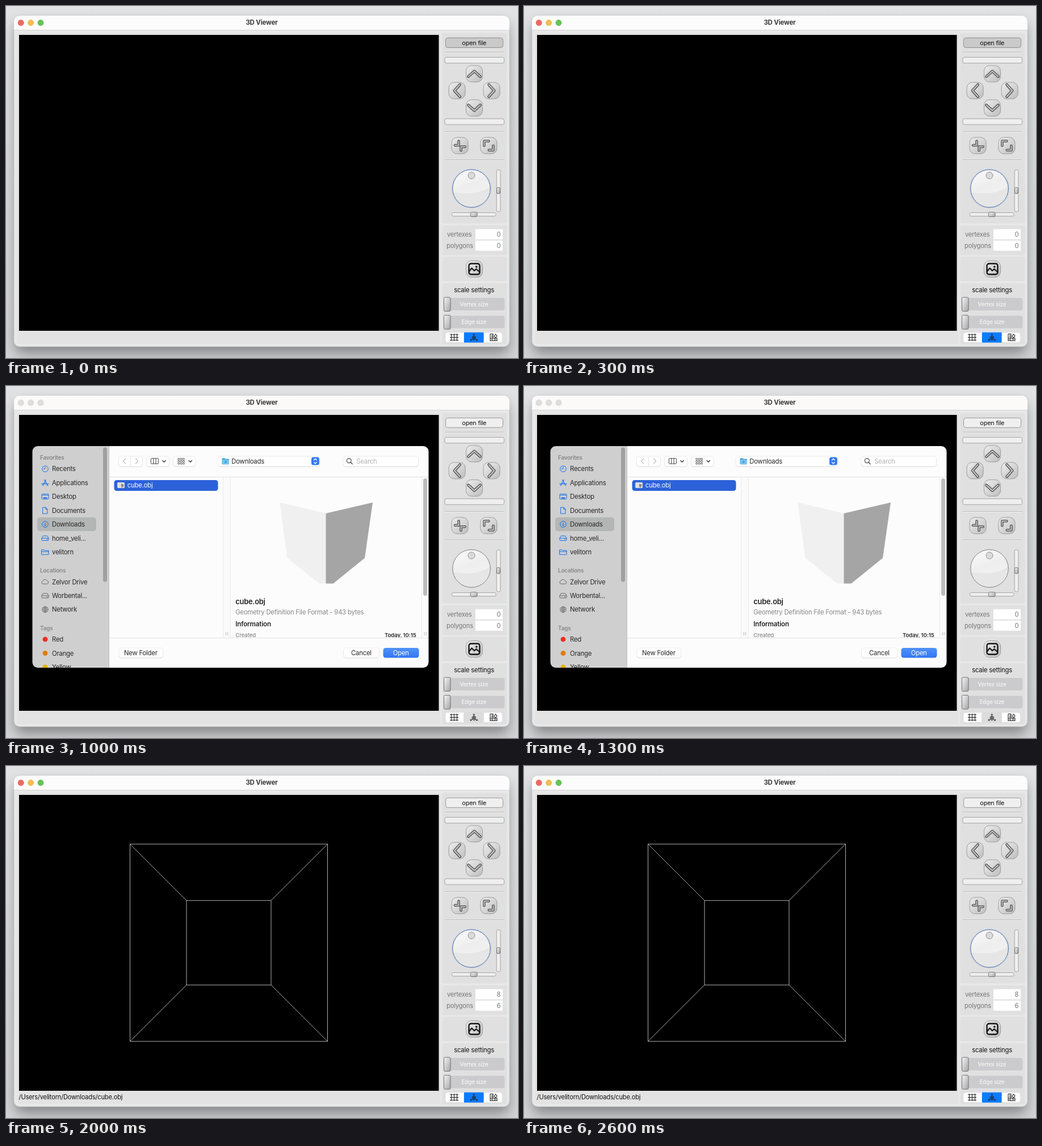
Recreate the animation shown at these times as an HTML page. Size 902 by 621 pixels, loop 3000 ms.

```html
<!DOCTYPE html>
<html lang="en">
<head>
<meta charset="utf-8">
<title>3D Viewer</title>
<style>
html, body { margin: 0; width: 100%; height: 100%; overflow: hidden; background: #dfe0e2; }
svg { display: block; width: 902px; height: 621px; font-family: Inter, "Open Sans", sans-serif; }
</style>
</head>
<body>
<svg id="stage" viewBox="0 0 902 621" xmlns="http://www.w3.org/2000/svg"></svg>
<script>
const LOOP = 3000;
const MARKS = [0, 500, 1000, 1500, 2000];

// --- drawing helpers -------------------------------------------------
const rect = (x, y, w, h, fill, r = 0, more = '') =>
  `<rect x="${x}" y="${y}" width="${w}" height="${h}" rx="${r}" fill="${fill}" ${more}/>`;
const dot = (x, y, r, fill, more = '') =>
  `<circle cx="${x}" cy="${y}" r="${r}" fill="${fill}" ${more}/>`;
const line = (d, color, w = 1, more = '') =>
  `<path d="${d}" fill="none" stroke="${color}" stroke-width="${w}" ${more}/>`;
const shape = (d, fill) => `<path d="${d}" fill="${fill}"/>`;
const text = (x, y, s, { size = 11.3, fill = '#262626', weight = 400, at = 'start', gap = -.2 } = {}) =>
  `<text x="${x}" y="${y}" font-size="${size}" fill="${fill}" font-weight="${weight}" text-anchor="${at}" letter-spacing="${gap}">${s}</text>`;
const when = (on, body) => `<g data-on="${on}">${body}</g>`;
const at = (x, y, body) => `<g transform="translate(${x} ${y})">${body}</g>`;
const edge = (color, w = 1) => `stroke="${color}" stroke-width="${w}"`;
const ROUND = 'stroke-linecap="round" stroke-linejoin="round"';

const fade = (id, stops, dir = 'x2="0" y2="1"') =>
  `<linearGradient id="${id}" ${dir}>${stops.map((c, i) =>
    `<stop offset="${i / (stops.length - 1)}" stop-color="${c}"/>`).join('')}</linearGradient>`;

const defs = `<defs>
  ${fade('back', ['#e1e2e4', '#d9dadc', '#d2d3d5'])}
  ${fade('metal', ['#ededed', '#d6d6d6', '#bdbdbd'], 'x2="1" y2="1"')}
  ${fade('knob', ['#f4f4f4', '#a6a6a6'], 'x2="1" y2="1"')}
  ${fade('dial', ['#fbfbfb', '#eeeeee', '#f3f3f3'], 'x2=".4" y2="1"')}
  ${fade('blue', ['#4f93f8', '#3276f4'])}
  ${fade('deep', ['#3c79ec', '#2a62db'])}
  <filter id="soft" x="-10%" y="-10%" width="120%" height="125%"><feGaussianBlur stdDeviation="11"/></filter>
  <clipPath id="sheet"><rect x="46.5" y="106" width="698" height="391" rx="9.5"/></clipPath>
  <clipPath id="pane"><rect x="396" y="161" width="336" height="282.5"/></clipPath>
</defs>`;

// --- main window -----------------------------------------------------
const lights = colors => colors.map(([c, b], i) =>
  dot(26.2 + i * 17.4, 29.6, 5.1, c, edge(b, .6))).join('');

function frame() {
  return rect(0, 0, 902, 621, 'url(#back)')
    + rect(16, 30, 869, 583, '#000', 12, 'opacity=".36" filter="url(#soft)"')
    + rect(14, 17, 873, 584, '#e8e8e8', 10, edge('#bfc0c1', .8))
    + `<path d="M14 42.5V27a10 10 0 0 1 10-10H877a10 10 0 0 1 10 10V42.5z" fill="#fcfcfc"/>`
    + when('01110', `<path d="M14 42.5V27a10 10 0 0 1 10-10H877a10 10 0 0 1 10 10V42.5z" fill="#fbfaf9"/>`)
    + line('M14 42.5H887', '#d5d5d5')
    + when('10001', lights([['#ed6a5f', '#d95448'], ['#f4be50', '#dca53a'], ['#62c555', '#4dad41']]))
    + when('01110', lights(Array(3).fill(['#dfdedd', '#c9c8c7'])))
    + text(450.5, 33.4, '3D Viewer', { size: 11.5, weight: 700, fill: '#3b3b3b', at: 'middle' })
    + rect(19.5, 47.5, 746, 549, '#e3e3e3', 3)
    + rect(23, 51, 739.5, 522, '#000');
}

function cube() {
  const [x, y, w, a, b, v] = [218.5, 137.8, 348, 318, 237.3, 149];
  const corners = [[0, 0], [1, 0], [0, 1], [1, 1]].map(([i, j]) =>
    `M${x + i * w} ${y + j * w}L${a + i * v} ${b + j * v}`).join('');
  return line(`M${x} ${y}h${w}v${w}h${-w}zM${a} ${b}h${v}v${v}h${-v}z${corners}`, '#cfcfcf', .85);
}

// --- control panel ---------------------------------------------------
const tile = (x, y, icon) => at(x, y,
  rect(-14.5, -14.5, 29, 29, 'url(#metal)', 9.5, edge('#959595', .9)) + icon);
const tube = (d, outer = 4.6, inner = 2) =>
  line(d, '#4c4c4c', outer, ROUND) + line(d, '#c9c9c9', inner, ROUND);
const chevron = turn =>
  `<g transform="rotate(${turn})">${tube('M-10.5 5L0-4.5L10.5 5', 4.8, 2.2)}</g>`;
const rule = y => line(`M773 ${y}H877`, '#b9b9b9') + line(`M773 ${y + 1}H877`, '#f3f3f3');
const bar = (x, y, w, h) => rect(x, y, w, h, '#efefef', 3, edge('#9b9b9b', .9));
const grip = (x, y, w, h, r = 2) => rect(x, y, w, h, 'url(#knob)', r, edge('#666', .9));

const sizer = (y, label) =>
  rect(781, y - 11, 97.5, 22, '#cbcbcd', 4)
  + text(824.5, y + 3.6, label, { size: 9.7, fill: '#f6f6f6', weight: 500, at: 'middle', gap: -.1 })
  + grip(771.5, y - 12, 11.5, 24.5);

const counter = (y, label, end) =>
  text(label === 'vertexes' ? 777 : 776, y + 3.8, label, { size: 11.2, fill: '#777' })
  + rect(827, y - 9, 48, 18, '#fff')
  + when('11110', text(871.6, y + 4.2, 0, { fill: '#777', at: 'end', gap: 0 }))
  + when('00001', text(871.6, y + 4.2, end, { fill: '#777', at: 'end', gap: 0 }));

function tabs() {
  const grid = line('M784.5 578v13M789.5 578v13M794.5 578v13M782 579.7h15M782 584.6h15M782 589.5h15', '#2b2b2b', 1.1);
  const axes = at(824.3, 584.8,
    line('M0-6V1L-6 5M0 1L6 5M-1.5-4.5L0-6.3L1.5-4.5M-6 3V5.3H-3.6M6 3V5.3H3.6', '#222', 1)
    + line('M-3-1L0-2.5L3-1V3L0 5L-3 3ZM-3-1L0 1L3-1M0 1V5', '#222', .9));
  const swatch = at(859, 584.5,
    line('M-6-6H-1V1M-6-6V6H6V1.5H-6M-4-3.5H-1.5M-4-1H-1.5M-2 1.5V6M2 1.5V6', '#222', 1.1)
    + line('M1-2L3.5-5.5L6-2.5L3.5 1Z', '#222', 1.1)
    + dot(-4, 3.8, .8, '#222') + dot(4, 3.8, .8, '#222'));
  return rect(774, 576, 100.5, 17.5, '#fff', 4, edge('#d6d6d6', .6))
    + line('M806.5 578V592M841.5 578V592', '#ddd')
    + when('10001', rect(807, 575.8, 34.5, 18, '#0a7bff'))
    + when('01110', rect(807, 575.8, 34.5, 18, '#dcdcdc'))
    + grid + axes + swatch;
}

function panel() {
  const groups = [[47.5, 336], [387, 52.5], [442.5, 43], [489, 108]]
    .map(([y, h]) => rect(768.5, y, 114, h, '#e0e0e0', 3)).join('');
  const picture = line('M-5.5-9.5H5.5Q9.5-9.5 9.5-5.5V5.5Q9.5 9.5 5.5 9.5H-5.5Q-9.5 9.5-9.5 5.5V-5.5Q-9.5-9.5-5.5-9.5Z', '#151515', 2.4)
    + line('M-9 4L-4.5-1.5L0 3L3.5 0L9 5', '#151515', 2.2, ROUND) + dot(3.8, -4, 1.8, '#151515');
  return groups
    + rect(774.5, 56.3, 101, 17, '#efefef', 4, edge('#8f8f8f', .9))
    + when('10000', rect(774.5, 56.3, 101, 17, '#cacaca', 4, edge('#8f8f8f', .9)))
    + text(824.8, 68.6, 'open file', { size: 10.9, fill: '#111', at: 'middle' })
    + rule(81.5) + bar(773, 90.5, 104.5, 10.3) + bar(773, 198.9, 104.5, 10.3)
    + tile(825, 119.5, chevron(0)) + tile(794.6, 149.3, chevron(-90))
    + tile(855.6, 149.3, chevron(90)) + tile(825, 179.9, chevron(180))
    + rule(221.5)
    + tile(799.6, 246.3, tube('M-2-8V-.5H-8.5') + tube('M9 2H2V8.5'))
    + tile(850.4, 246.3, tube('M-8 0V-8H0') + tube('M8 .5V8H.5'))
    + rule(271.5)
    + dot(820, 322, 33.3, 'url(#dial)')
    + shape('M786.8 321A33.3 33.3 0 0 0 834 352Q851 342 853 319Q826 336 786.8 328Z', '#e6e6e6')
    + when('10001', dot(820, 322, 34.3, 'none', edge('#c5d5ea', 1.4)) + dot(820, 322, 33.3, 'none', edge('#516c96', 1)))
    + when('01110', dot(820, 322, 33.3, 'none', edge('#7d7d7d', 1)))
    + dot(820, 299, 6, '#dadada', edge('#8d8d8d', 1))
    + bar(864.2, 289, 6.8, 74) + grip(864.5, 320.3, 6, 10.7)
    + bar(785.3, 364.6, 78, 6.2) + grip(818.4, 363.8, 11.7, 7.8)
    + counter(402.7, 'vertexes', 8) + counter(422.7, 'polygons', 6)
    + tile(825, 464, picture)
    + text(824.6, 505, 'scale settings', { fill: '#111', at: 'middle' })
    + sizer(526, 'Vertex size') + sizer(557.6, 'Edge size')
    + tabs();
}

// --- file dialog -----------------------------------------------------
const BLUE = '#1470e6', GREY = '#666';
const icons = {
  clock: line('M0-3.5V0H-3', BLUE) + dot(0, 0, 5.3, 'none', edge(BLUE)),
  apps: line('M-4.3 5L1-5M-1-5L4.3 5M-6 2H1.5M4 2H6', BLUE, 1.3, ROUND),
  desk: rect(-6, -4.7, 12, 9, 'none', 1.3, edge(BLUE)) + line('M-6-2.7H6', BLUE) + rect(-3.5, 1.2, 7, 2, BLUE),
  page: line('M-4-5.5H1L4-2V5.5H-4ZM1-5.5V-2H4', BLUE, 1, ROUND),
  down: dot(0, 0, 5.3, 'none', edge(BLUE)) + line('M0-3V2.7M-2.2.6L0 2.8L2.2.6', BLUE),
  disk: c => line('M-6 0L-3.8-4H3.8L6 0V3.2Q6 4 5 4H-5Q-6 4-6 3.2ZM-6 0H6M2.5 2H4', c, 1, ROUND),
  folder: line('M-6-4H-2L-.8-2.8H6V4.3H-6ZM-6-.8H6', BLUE, 1, ROUND),
  cloud: line('M-4 3.8A2.8 2.8 0 0 1-4.2-1.5A4 4 0 0 1 3-2A3 3 0 0 1 3.8 3.8Z', GREY),
  globe: dot(0, 0, 5.2, 'none', edge(GREY, .9))
    + line('M-5.2 0H5.2M0-5.2V5.2M-4-3Q0-1.4 4-3M-4 3Q0 1.4 4 3M0-5.2Q-5 0 0 5.2Q5 0 0-5.2', GREY, .8)
};

function sidebar() {
  const head = (y, s) => text(60, y + 3.5, s, { size: 9.8, weight: 600, fill: '#868686', gap: -.12 });
  const row = (y, s, icon) => at(69, y, icon) + text(81, y + 4.1, s);
  const tag = c => dot(0, 0, 4.4, c);
  return rect(46, 106, 135.5, 392, '#cfcfcf')
    + line('M181.5 106V497', '#c2c2c2')
    + rect(55, 231.8, 104, 24.2, '#b4b5b5', 5)
    + rect(171, 108.5, 7, 237, '#a0a0a0', 3.5)
    + head(126.7, 'Favorites')
    + row(146.2, 'Recents', icons.clock) + row(170.7, 'Applications', icons.apps)
    + row(195.2, 'Desktop', icons.desk) + row(219.6, 'Documents', icons.page)
    + row(244, 'Downloads', icons.down) + row(268.5, 'home_veli...', icons.disk(BLUE))
    + row(293, 'velitorn', icons.folder)
    + head(325.8, 'Locations')
    + row(345.4, 'Zelvor Drive', icons.cloud) + row(369.9, 'Worbental...', icons.disk(GREY))
    + row(394.3, 'Network', icons.globe)
    + head(427, 'Tags')
    + row(446.9, 'Red', tag('#ea2d22')) + row(471.4, 'Orange', tag('#e07b0c'))
    + row(495.8, 'Yellow', tag('#e2b20a'));
}

const button = (x, y, w, h = 18) =>
  rect(x, y + .8, w, h, '#dadada', 4.5) + rect(x, y, w, h, '#fff', 4.5, edge('#e2e2e2', .7));
const caret = x => line(`M${x - 2.7} 131.5l2.7 2.7l2.7-2.7`, '#333', 1.3, ROUND);

function toolbar() {
  let cells = '';
  for (let i = 0; i < 9; i++) {
    const x = 302.8 + i % 3 * 4.3, y = 127.6 + (i / 3 | 0) * 4;
    cells += rect(x, y, 3, 2.4, 'none', .4, edge('#444', .8));
  }
  return button(198.5, 124, 42) + line('M219.5 125V141', '#e4e4e4')
    + line('M210.5 128.3l-4 4.3l4 4.3M228.5 128.3l4 4.3l-4 4.3', '#b8b8b8', 1.2, ROUND)
    + button(247.5, 124, 40) + rect(255.4, 127.7, 13, 9.5, 'none', 1, edge('#444'))
    + line('M259.7 127.7v9.5M264.1 127.7v9.5', '#444') + caret(278.5)
    + button(294.5, 124, 39.5) + cells + caret(324.8)
    + button(373, 124, 180)
    + shape('M380.5 128.5q0-1.3 1.3-1.3h3.4l1.3 1.4h5.2q1.3 0 1.3 1.3v7q0 1.4-1.3 1.4h-9.9q-1.3 0-1.3-1.4z', '#4aa5dd')
    + rect(380.5, 130.2, 12.5, 8.1, '#79c6f0', 1.2)
    + dot(386.7, 134.2, 2.3, '#4aa5dd')
    + text(397.3, 136.5, 'Downloads')
    + rect(538, 125.6, 13.8, 14, '#3478f6', 3.5)
    + line('M542.4 130.9l2.5-2.6l2.5 2.6M542.4 134.4l2.5 2.6l2.5-2.6', '#fff', 1.3, ROUND)
    + button(594, 124, 132.5)
    + dot(604.3, 131.8, 3.9, 'none', edge('#444', 1.2)) + line('M607.2 134.7l3 3', '#444', 1.3, ROUND)
    + text(617.2, 137, 'Search', { fill: '#b3b3b3' });
}

const fileIcon = rect(196.3, 170.2, 12.4, 9.6, '#f4f4f4', .8, edge('#bdbdbd', .7))
  + shape('M202.6 172l4.6 1.2v4.3l-2.3 1.6l-2.3-1z', '#8c8c8c') + rect(197.5, 171.5, 4, 7, '#dedede');
const grab = x => line(`M${x - 1.6} 434v6M${x + 1.6} 434v6`, '#b5b5b5', .9);

function preview() {
  const small = { size: 9.6, weight: 600, gap: -.1 };
  return rect(190.5, 166, 183, 19, '#2c62d9', 4.5) + fileIcon
    + text(213.8, 179.1, 'cube.obj', { fill: '#fff' })
    + line('M732.5 161V443', '#e8e8e8') + rect(735, 163, 7, 207, '#bcbcbc', 3.5) + grab(738.5)
    + shape('M482.3 205.5L563.7 224.7V348.5H552L495.5 303.5Z', '#f0f0f0')
    + shape('M563.5 224.7L646 205.5L632 303.5L576.5 348.5H563.5Z', '#a5a5a5')
    + `<g clip-path="url(#pane)">`
    + text(404.3, 385, 'cube.obj', { size: 12.9, weight: 600, gap: -.25 })
    + text(404.3, 402.6, 'Geometry Definition File Format - 943 bytes', { fill: '#868686' })
    + text(404.3, 423.6, 'Information', { size: 11.6, weight: 600 })
    + text(404.3, 442.8, 'Created', { ...small, weight: 500, fill: '#868686' })
    + text(722.5, 442.8, 'Today, 10:15', { ...small, at: 'end' })
    + '</g>';
}

function dialog() {
  const mid = { at: 'middle' };
  const open = fill => rect(664.5, 462, 63, 17.5, fill, 4.5);
  const openText = fill => text(695.8, 474.5, 'Open', { ...mid, fill });
  return when('01110',
    `<g clip-path="url(#sheet)">`
    + rect(46, 106, 699, 392, '#fcfcfc') + sidebar() + toolbar()
    + line('M182 160.5H745M182 444.5H745', '#e2e2e2')
    + rect(383, 161, 12.5, 283, '#fafafa')
    + line('M382.7 161V444M395.3 161V444', '#e9e9e9') + grab(389)
    + button(199, 462, 77.5, 17.5) + text(237.3, 474.5, 'New Folder', mid)
    + button(594.5, 462, 63, 17.5) + text(626, 474.5, 'Cancel', mid)
    + when('01000', fileIcon + text(213.8, 179.1, 'cube.obj')
      + rect(597, 161, 12, 283, '#fafafa') + line('M596.8 161V444M609 161V444', '#e9e9e9')
      + rect(664.5, 462, 63, 17.5, '#fdfdfd', 4.5, edge('#ececec', .7)) + openText('#bdbdbd'))
    + when('00110', preview())
    + when('00100', open('url(#blue)') + openText('#fff'))
    + when('00010', open('url(#deep)') + openText('#fff'))
    + '</g>');
}

const stage = document.getElementById('stage');
stage.innerHTML = defs + frame() + panel()
  + when('00001', cube() + text(22.6, 588, '/Users/velitorn/Downloads/cube.obj', { size: 11.1, fill: '#111' }))
  + dialog();

// Each digit of data-on tells whether the group shows from that mark on.
for (const el of stage.querySelectorAll('[data-on]')) {
  const on = [...el.dataset.on].map(Number);
  const keys = MARKS.map((t, i) => ({ offset: t / LOOP, opacity: on[i], easing: 'step-end' }));
  keys.push({ offset: 1, opacity: on.at(-1) });
  el.animate(keys, { duration: LOOP, iterations: Infinity });
}
</script>
</body>
</html>
```
